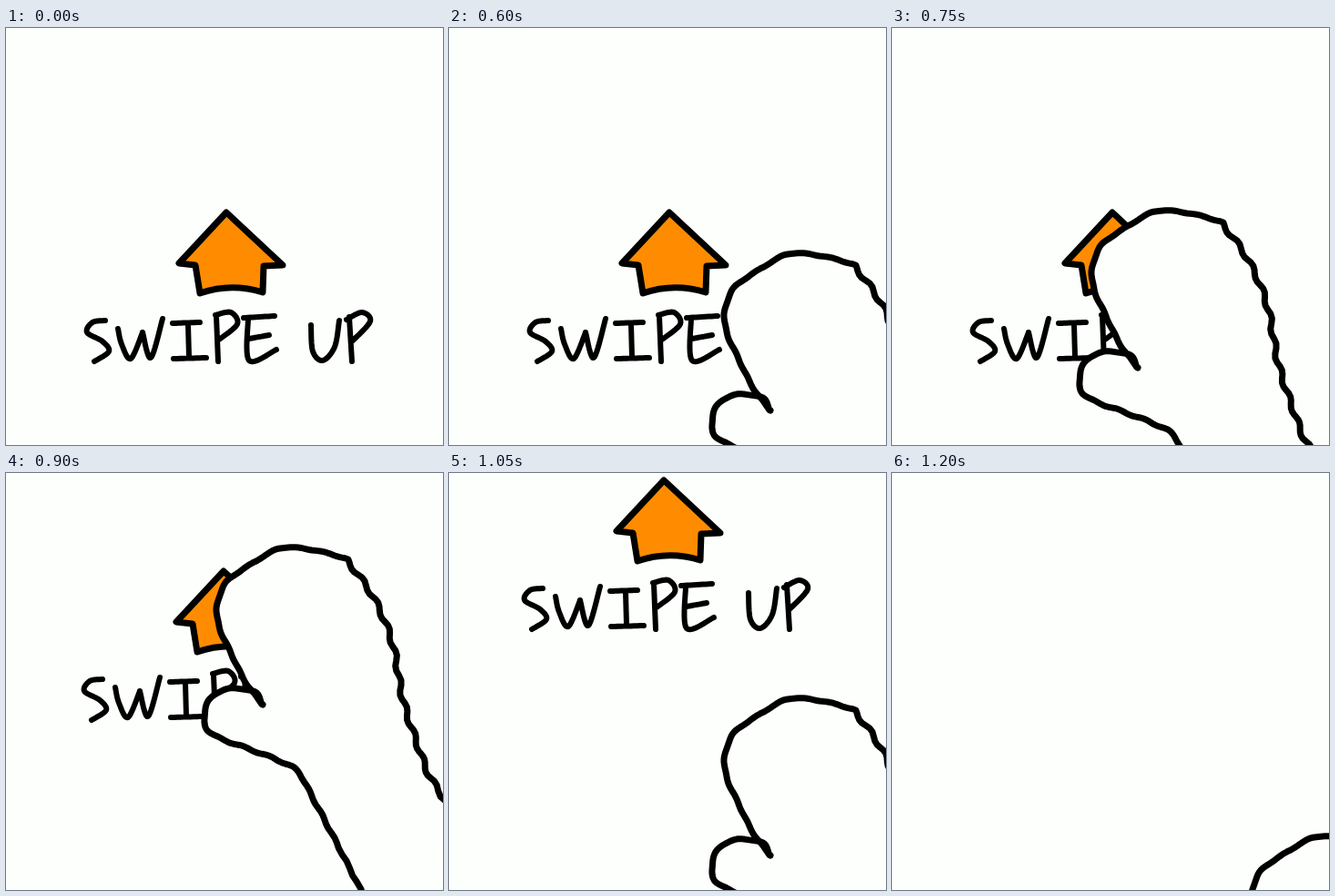
Recreate the animation shown at these times as an HTML page with a canvas. Size 480x459 px, loop 1.35 s.

```html
<!DOCTYPE html>
<html lang="en">
<head>
<meta charset="utf-8">
<title>Swipe up</title>
<style>
html, body { margin: 0; width: 100%; height: 100%; overflow: hidden; background: #fdfffc; }
canvas { display: block; }
</style>
</head>
<body>
<canvas id="stage" width="480" height="459" role="img" aria-label="SWIPE UP"></canvas>
<script>
const ctx = document.getElementById('stage').getContext('2d');
const PAPER = '#fdfffc', INK = '#000', ORANGE = '#ff8c00';
const LOOP = 1350, HOLD = 600, STEP = 150;

// One pose for the hold, then one per step: shift of the sign and of the hand
const REACH = [83, 47];
const POSES = [
  { sign: [0, 0] },
  { sign: [0, 0], hand: REACH },
  { sign: [0, 0], hand: [0, 0] },
  { sign: [-3, -95], hand: [12, -119] },
  { sign: [-6, -195], hand: REACH },
  { hand: [175, 199] }
];

const points = s => s.trim().split(/\s+/).map(p => p.split(',').map(Number));

// Smooth line through key points, with a shaky-pen wobble across it
function spline(keys, wobble = 0, period = 30) {
  const pts = points(keys), out = [], N = 12;
  const at = i => pts[Math.max(0, Math.min(pts.length - 1, i))];
  const mix = (i, u, k) => {
    const [a, b, c, d] = [-1, 0, 1, 2].map(j => at(i + j)[k]);
    return b + u / 2 * (c - a + u * (2 * a - 5 * b + 4 * c - d + u * (3 * (b - c) + d - a)));
  };
  let len = 0, prev = pts[0];
  for (let n = 0; n <= (pts.length - 1) * N; n++) {
    const i = Math.floor(n / N), u = n / N - i;
    const x = mix(i, u, 0), y = mix(i, u, 1);
    const dx = x - prev[0], dy = y - prev[1], d = Math.hypot(dx, dy);
    len += d;
    const w = d ? wobble * Math.cos(2 * Math.PI * len / period) / d : 0;
    out.push([x + dy * w, y - dx * w]);
    prev = [x, y];
  }
  return out;
}

const finger = [
  ...spline(`270,374 251,349 235,317 222,288 220,264 230,239 253,222 274,209
    293,201 327,204 361,213`, 0.5),
  ...spline('361,213 391,255 412,305 424,368 440,418 457,459 500,520', 2)
];
const thumb = spline(`270,374 262,361 243,356 219,361 208,376 206,394 217,408 250,421
  284,434 308,447 323,473 351,526 392,606`, 0.8);

const letters = [
  '109,322 95,324 89,335 106,345 113,356 97,367',
  '123,331 127,348 137,364 150,335', '150,335 159,363 172,320',
  '183,325 213,324', '200,326 201,362', '184,364 220,363',
  '231,317 233,367', '230,316 247,313 254,326 234,343',
  '261,319 295,317', '266,319 267,366 297,354', '267,342 289,338',
  '335,327 337,356 348,366 361,351 366,322',
  '377,318 380,367', '374,321 391,313 400,323 380,345'
].map(s => spline(s));

function trace(pts, join = false) {
  pts.forEach(([x, y], i) => i || join ? ctx.lineTo(x, y) : ctx.moveTo(x, y));
}

function drawSign() {
  ctx.beginPath();
  trace(points('282,291 283,262 304,261 242,203 190,259 208,261 213,292'));
  ctx.quadraticCurveTo(247, 280, 282, 291);
  ctx.closePath();
  ctx.fillStyle = ORANGE;
  ctx.fill();
  ctx.lineWidth = 7;
  ctx.stroke();
  ctx.beginPath();
  letters.forEach(l => trace(l));
  ctx.lineWidth = 6;
  ctx.stroke();
}

function drawHand() {
  ctx.beginPath();
  trace(finger);
  trace([...thumb].reverse(), true);
  ctx.fillStyle = PAPER;
  ctx.fill();
  ctx.beginPath();
  trace(finger);
  trace(thumb);
  ctx.lineWidth = 7;
  ctx.stroke();
}

function place(shift, draw) {
  if (!shift) return;
  ctx.save();
  ctx.translate(...shift);
  draw();
  ctx.restore();
}

function render(now) {
  const t = now % LOOP;
  const pose = POSES[t < HOLD ? 0 : 1 + Math.floor((t - HOLD) / STEP)];
  ctx.fillStyle = PAPER;
  ctx.fillRect(0, 0, 480, 459);
  ctx.strokeStyle = INK;
  ctx.lineCap = ctx.lineJoin = 'round';
  place(pose.sign, drawSign);
  place(pose.hand, drawHand);
}

const t0 = performance.now();
function tick() {
  render(performance.now() - t0);
  requestAnimationFrame(tick);
}
tick();
</script>
</body>
</html>
```
